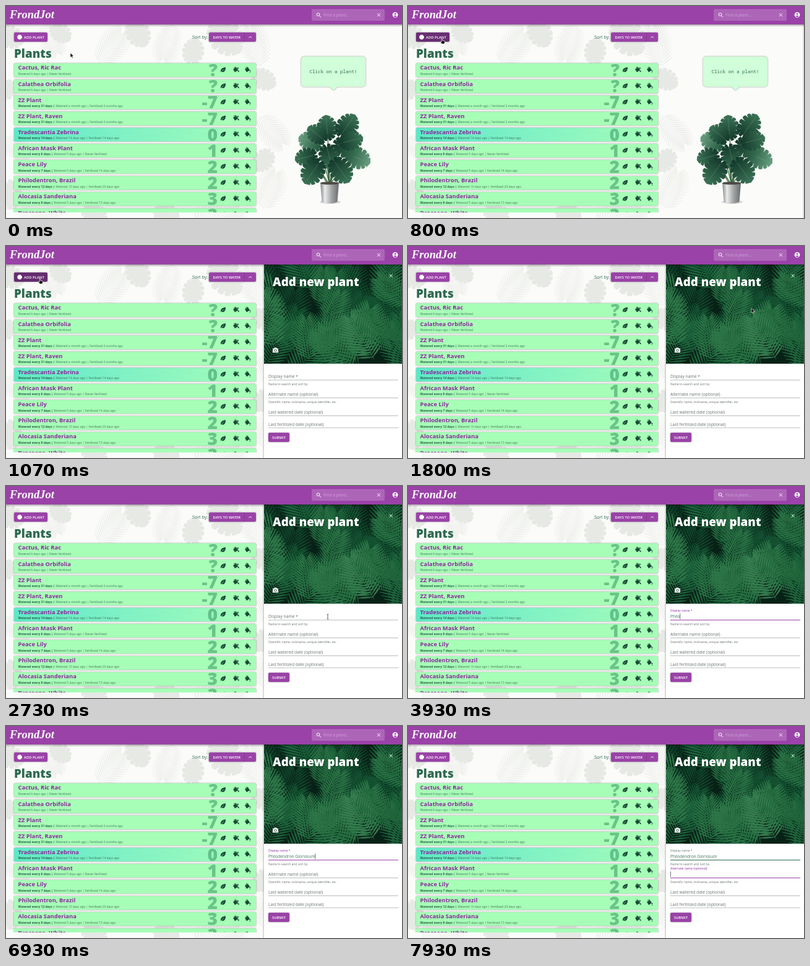
Write an HTML page that moves like this. It is 640 by 344 pixels and loops after 8 s.

```html
<!DOCTYPE html>
<html lang="en">
<head>
<meta charset="utf-8">
<title>Plant tracker</title>
<style>
html, body { margin: 0; width: 100%; height: 100%; overflow: hidden; background: #fbfbfa; }
svg { display: block; width: 100%; height: 100%; font-family: "Open Sans", sans-serif; }
text { white-space: pre; }
.brand { font: italic bold 18.5px "Liberation Serif", serif; fill: #fff; }
.heading { font-size: 18.8px; font-weight: 800; }
.name { font-size: 9.4px; font-weight: 700; fill: #8b2a9b; }
.note { font-size: 4.95px; fill: #43745c; }
.note tspan { font-weight: 700; fill: #2a6049; }
.days { font-size: 28.2px; font-weight: 800; fill: #2d8a5a; fill-opacity: .5; text-anchor: end; }
.button { font-size: 5.9px; font-weight: 600; fill: #fff; }
.mono { font: 7.52px "Roboto Mono", "Noto Sans Mono", monospace; fill: #2f6b50; }
.label { font-size: 6.75px; }
.help { font-size: 4.95px; fill: #68736d; }
.typed { font-size: 6.58px; fill: #3a7459; }
.raised { filter: drop-shadow(0 .8px .8px rgba(0,0,0,.45)); }
</style>
</head>
<body>
<svg id="stage" viewBox="0 0 640 344" preserveAspectRatio="none"></svg>
<script>
const LOOP = 8000, PURPLE = '#9a42a8', GREEN = '#2d6b50', PANEL_X = 417;
const stage = document.getElementById('stage');
const clamp = v => Math.max(0, Math.min(1, v));
const smooth = v => v * v * (3 - 2 * v);
const easeOut = v => 1 - (1 - clamp(v)) ** 3;
const pt = (x, y) => x.toFixed(3) + ' ' + y.toFixed(3);

// Split heart-shaped leaf, stem at the origin, tip at x = 1.
function splitLeaf() {
  const side = [];
  for (let i = 0; i < 7; i++) {
    const a = 2.85 - i * .42;
    for (const [da, k] of [[.15, .96], [0, 1.04], [-.13, .98], [-.21, .5]])
      if (i < 6 || da >= 0) side.push([.4 + .6 * Math.cos(a + da) * (k < .6 ? .8 : 1), .48 * k * Math.sin(a + da)]);
  }
  const mirror = side.slice().reverse().map(([x, y]) => [x, -y]);
  return 'M0 0L' + [...side, [1.03, 0], ...mirror].map(p => pt(...p)).join('L') + 'Z';
}

// Palm frond, stem at the origin, tip near x = 1.
function frond(count = 17) {
  let d = '';
  for (let i = 1; i <= count; i++) {
    const u = i / count, x = u * .92, len = .12 + .36 * Math.sin(Math.PI * (.12 + .78 * u));
    for (const s of [-1, 1]) {
      const a = s * (1.15 - .6 * u), c = Math.cos(a), n = Math.sin(a), w = .024;
      d += `M${pt(x, 0)}Q${pt(x + c * len * .5 - n * w, n * len * .5 + c * w)} ${pt(x + c * len, n * len)}` +
           `Q${pt(x + c * len * .5 + n * w, n * len * .5 - c * w)} ${pt(x, 0)}`;
    }
  }
  return d;
}

const use = (id, x, y, size, angle, fill) =>
  `<use href="#${id}" transform="translate(${x} ${y}) rotate(${angle}) scale(${size})" fill="${fill}" stroke="${fill}"/>`;
const text = (cls, x, y, s, extra = '') => `<text class="${cls}" x="${x}" y="${y}" ${extra}>${s}</text>`;
const box = (x, y, w, h, fill, extra = '') => `<rect x="${x}" y="${y}" width="${w}" height="${h}" fill="${fill}" ${extra}/>`;
const cross = (x, y, r) => `<path d="M${x - r} ${y - r}l${2 * r} ${2 * r}m0 ${-2 * r}l${-2 * r} ${2 * r}" stroke="#fff" fill="none"/>`;

const defs = `<defs>
  <path id="split" d="${splitLeaf()}" stroke-width=".025" stroke-linejoin="round"/>
  <path id="frond" d="${frond()}M0 0L.95 0" stroke-width=".008"/>
  <linearGradient id="due"><stop stop-color="#5ce9c6"/><stop offset=".4" stop-color="#7cf0c6"/><stop offset="1" stop-color="#a5fdb8"/></linearGradient>
  <linearGradient id="dark"><stop stop-color="#12372a"/><stop offset="1" stop-color="#3b7355"/></linearGradient>
  <linearGradient id="light"><stop stop-color="#1d5039"/><stop offset="1" stop-color="#6a9f80"/></linearGradient>
  <linearGradient id="metal"><stop stop-color="#85888a"/><stop offset=".25" stop-color="#e9eaea"/><stop offset=".6" stop-color="#a2a5a6"/><stop offset="1" stop-color="#686c6e"/></linearGradient>
  <linearGradient id="shade" x2="0" y2="1"><stop stop-opacity=".3"/><stop offset="1" stop-opacity="0"/></linearGradient>
  <clipPath id="list"><rect y="90" width="410" height="245"/></clipPath>
  <clipPath id="photo"><rect width="223" height="161"/></clipPath>
  <g id="leafIcon"><path d="M-4 4C-5-2 0-4 4-4C4 1 2 5-3 3.2Z"/><path d="M-4 4L1-1" stroke="#a7feb7" stroke-width=".7"/></g>
  <g id="can"><path d="M-4-1L1-4L4 .5L-1 4Z"/><path d="M-2-2Q-3-5 1-4M3 1L5 2" fill="none" stroke="#174a35" stroke-width="1"/></g>
</defs>`;

function backdrop() {
  const leaves = [
    ['split', -8, 45, 38, 20], ['frond', 60, 28, 55, 65], ['split', 78, 35, 32, 40], ['frond', 150, 96, 66, -55],
    ['split', 205, 30, 40, 60], ['frond', 270, 28, 62, 105], ['split', 300, 88, 36, -80], ['split', 340, 34, 55, 48],
    ['frond', 412, 100, 70, -105], ['split', 404, 112, 35, 30], ['frond', 408, 178, 62, 50], ['split', 425, 240, 34, 130],
    ['frond', 415, 330, 65, -70], ['split', 10, 130, 34, 150], ['frond', -5, 215, 50, 35], ['split', 3, 290, 40, 80],
    ['frond', 20, 344, 70, -20], ['split', 130, 330, 36, 30], ['split', 245, 333, 35, 15], ['frond', 300, 350, 80, -15]
  ];
  return box(0, 0, 640, 344, '#fbfbfa') +
    leaves.map(([id, x, y, s, a]) => use(id, x, y, s, a, id === 'split' ? '#e6e9e4' : '#edefeb')).join('');
}

function header() {
  return box(0, 30, 640, 4, 'url(#shade)') + box(0, 0, 640, 30, PURPLE) + text('brand', 6, 20, 'FrondJot') +
    box(494, 5, 118, 19, '#ad65b8', 'rx="2"') +
    `<g fill="none" stroke="#fff" stroke-width="1"><circle cx="504.5" cy="13.8" r="2.4"/><path d="M506.3 15.6l2.7 2.7"/></g>` +
    text('label', 513, 17, 'Find a plant...', 'fill="#cfa0d6"') + cross(602.5, 14.5, 2.4) +
    `<circle cx="629" cy="14.3" r="4.4" fill="#fff"/><g fill="${PURPLE}"><circle cx="629" cy="12.8" r="1.4"/><path d="M626.2 16.8Q629 13.8 631.8 16.8Q629 19 626.2 16.8"/></g>`;
}

function toolbar() {
  return `<g class="raised">${box(13, 43, 54, 15, PURPLE, 'rx="2" id="add"')}${box(328, 43, 76, 15, PURPLE, 'rx="2"')}</g>` +
    `<circle id="ripple" cx="55" cy="51" fill="#fff"/>` +
    `<circle cx="22" cy="50.5" r="2.9" fill="#fff" stroke="#fff" stroke-width="2.2" stroke-dasharray="1.7 .6"/>` +
    text('button', 29, 52.7, 'ADD PLANT') + text('label', 301, 53, 'Sort by:', `fill="${GREEN}" style="font-size:7.1px"`) +
    text('button', 334.5, 52.7, 'DAYS TO WATER') +
    `<path d="M385.5 43v15" stroke="#7d3289" stroke-width=".6"/><path d="M392.5 51.7l2.2-2.2l2.2 2.2" fill="none" stroke="#fff" stroke-width="1"/>` +
    text('heading', 13, 84, 'Plants', `fill="${GREEN}"`);
}

const plants = [
  ['Cactus, Ric Rac', '?', 0, '6 days', 'Never fertilized'],
  ['Calathea Orbifolia', '?', 0, '6 days', 'Never fertilized'],
  ['ZZ Plant', '-7', 31, 'a month', 'Fertilized 2 months ago'],
  ['ZZ Plant, Raven', '-7', 31, 'a month', 'Fertilized 2 months ago'],
  ['Tradescantia Zebrina', '0', 14, '14 days', 'Fertilized 14 days ago'],
  ['African Mask Plant', '1', 6, '5 days', 'Never fertilized'],
  ['Peace Lily', '2', 7, '5 days', 'Fertilized 14 days ago'],
  ['Philodentron, Brazil', '2', 12, '10 days', 'Fertilized 20 days ago'],
  ['Alocasia Sanderiana', '3', 8, '5 days', 'Fertilized 13 days ago'],
  ['Dracaena, White', '3', 8, '5 days', 'Never fertilized']
];
function row([name, days, every, watered, fed], i) {
  const cycle = every ? `<tspan>Watered every ${every} days |</tspan> ` : '';
  const icon = (id, x) => `<use href="#${id}" x="${x}" y="10.5" fill="#174a35"/>`;
  return `<g transform="translate(0 ${93 + i * 26.13})">` +
    box(13, 0, 391, 22.3, days === '0' ? 'url(#due)' : '#a7feb7', 'rx="1.5" class="raised"') +
    text('days', 342, 21.2, days) + text('name', 19.5, 10.4, name) +
    text('note', 19.5, 18.8, `${cycle}Watered ${watered} ago | ${fed}`) +
    icon('leafIcon', 351) + icon('can', 371) + icon('can', 390) +
    `<g fill="#174a35"><path d="M373 7l3 0l-1 3zM374 13l2.5-1.5l0 3z"/><circle cx="395" cy="12.5" r=".8"/><circle cx="394.3" cy="14.6" r=".7"/></g></g>`;
}

function welcome() {
  const leaves = [
    [520, 212, 34, -95, 0], [543, 207, 36, -55, 0], [506, 225, 34, -160, 1], [497, 242, 30, 165, 0],
    [554, 241, 36, 22, 1], [535, 225, 36, 15, 0], [519, 231, 35, 75, 0], [505, 256, 38, 125, 0],
    [532, 254, 38, 55, 0], [545, 222, 32, -15, 0], [512, 216, 30, -140, 0]
  ];
  const stems = leaves.map(([x, y]) => `M523 290Q${(x + 523) / 2} ${y + 30} ${x} ${y}`).join('');
  return `<g class="raised">${box(477, 82, 104, 49, '#d0ffd9', 'rx="5"')}<path d="M523.5 131h12l-6 6z" fill="#d0ffd9"/></g>` +
    text('mono', 490.5, 109, 'Click on a plant!') +
    `<ellipse cx="524" cy="318" rx="17" ry="3" fill="#000" opacity=".15"/><path d="${stems}" fill="none" stroke="#3d6b43" stroke-width="1.3"/>` +
    leaves.map(([x, y, s, a, lit]) => use('split', x, y, s, a, `url(#${lit ? 'light' : 'dark'})`) +
      `<path d="M0 0L${s * .9} 0" transform="translate(${x} ${y}) rotate(${a})" stroke="#7fa58a" stroke-width=".5" opacity=".7"/>`).join('') +
    `<path d="M508 287H538L535.5 318Q523 323 510.5 318Z" fill="url(#metal)"/><ellipse cx="523" cy="287.5" rx="15" ry="2.3" fill="#4c4b43"/>`;
}

function photo() {
  let seed = 23, out = box(0, 0, 223, 161, '#0a2419');
  const rnd = () => (seed = seed * 16807 % 2147483647) / 2147483647;
  const tones = ['#0f3b27', '#155032', '#1b653d', '#287c4b', '#3a9058'];
  for (let i = 0; i < 48; i++) {
    const tone = tones[Math.min(4, Math.floor(i / 11 + rnd()))];
    out += use('frond', (rnd() * 270 - 25).toFixed(1), (rnd() * 160 + 22).toFixed(1), (55 + rnd() * 38).toFixed(1), (-rnd() * 150 - 15).toFixed(1), tone);
  }
  out += use('frond', 95, 158, 96, -45, '#31864f') + use('frond', 178, 154, 80, -120, '#479b64') + use('frond', 150, 78, 72, 40, '#2c7d4a');
  return `<g clip-path="url(#photo)">${out}${box(0, 0, 223, 161, '#03170e', 'opacity=".22"')}</g>`;
}

const fields = [
  ['Display name *', 217.5, 'Name to search and sort by'],
  ['Alternate name (optional)', 246.5, 'Scientific name, nickname, unique identifier, etc'],
  ['Last watered date (optional)', 275.5, ''],
  ['Last fertilized date (optional)', 295, '']
];
function panel() {
  const form = fields.map(([label, y, help], i) =>
    `<text class="label" id="label${i}">${label}</text>` +
    `<path d="M7 ${y}H217" stroke="#8b928e" stroke-width=".6"/><path id="line${i}" stroke-width="1.1"/>` +
    text('help', 7, y + 8, help)).join('');
  return `<g id="panel">${box(-2, 30, 3, 314, '#000', 'opacity=".13"')}${box(0, 30, 223, 314, '#fff')}<g transform="translate(0 30)">${photo()}</g>` +
    text('heading', 14, 65, 'Add new plant', 'fill="#fff"') + cross(205, 48.3, 2.5) +
    `<path d="M14 166.3h2l1-1.3h3l1 1.3h2v6.7h-9z" fill="#fff"/><circle cx="18.5" cy="169.6" r="1.8" fill="none" stroke="#12382a" stroke-width=".8"/>` +
    form + text('typed', 7, 214.2, '', 'id="typed"') + `<path id="caret" stroke="#333" stroke-width=".7"/>` +
    box(7, 303, 34, 15, PURPLE, 'rx="2" class="raised"') + text('button', 24, 312.7, 'SUBMIT', 'text-anchor="middle"') + '</g>';
}

const cursors = `<g id="cursor" stroke-linejoin="round">
  <path id="arrow" d="M0 0V7.6L1.8 6L3 8.8L4.3 8.2L3.1 5.5H5.5Z" fill="#111" stroke="#fff" stroke-width=".6"/>
  <path id="hand" d="M-.8 .3Q0-.7 .8 .3V3L4 3.8Q4.8 4.2 4.5 6L3.6 8.6H-.4L-2.8 5.2Q-2.2 4.2-.8 5.3Z" fill="#111" stroke="#fff" stroke-width=".7"/>
  <path id="beam" d="M-1.5-4Q0-4 0-3Q0-4 1.5-4M0-3V3M-1.5 4Q0 4 0 3Q0 4 1.5 4" fill="none" stroke="#222" stroke-width=".7"/>
</g>`;

stage.innerHTML = defs + backdrop() + toolbar() + `<g clip-path="url(#list)">${plants.map(row).join('')}</g>` +
  welcome() + panel() + header() + cursors;

const $ = id => document.getElementById(id);
const set = (id, attrs) => { for (const k in attrs) $(id).setAttribute(k, attrs[k]); };

const CLICK = 800, FOCUS = 2900, TYPE = 3200, KEY = 164, TAB = 7450;
const ENTRY = 'Philodendron Gloriosum';
const route = [[0, 104, 76], [80, 104, 76], [620, 55, 53], [1250, 55, 53], [1760, 555, 101], [2150, 555, 101], [2620, 520, 212], [LOOP, 520, 212]];

function pointer(t) {
  const i = route.findIndex(p => p[0] > t), [t0, x0, y0] = route[i - 1], [t1, x1, y1] = route[i];
  const k = smooth((t - t0) / (t1 - t0));
  return [x0 + (x1 - x0) * k, y0 + (y1 - y0) * k];
}

function drawField(i, t, focusAt, blurAt) {
  const y = fields[i][1], up = easeOut((t - focusAt) / 200), focused = t >= focusAt && t < blurAt;
  const half = 105 * up, hovered = i === 0 && t >= blurAt;
  set('label' + i, {
    transform: `translate(7 ${y - 3.5 - 10.4 * up}) scale(${1 - .26 * up})`,
    fill: focused ? '#8e2a9e' : '#68736d'
  });
  set('line' + i, { d: `M${112 - half} ${y}H${112 + half}`, stroke: focused ? PURPLE : GREEN, opacity: focused || hovered ? 1 : 0 });
}

function render(t) {
  const slide = easeOut((t - CLICK) / 240);
  set('panel', { transform: `translate(${PANEL_X + 226 * (1 - slide)} 0)` });

  const [x, y] = pointer(t), overAdd = x < 67 && y < 58, overField = y > 203;
  set('cursor', { transform: `translate(${x} ${y})`, opacity: t < TYPE ? 1 : 0 });
  set('arrow', { opacity: overAdd || overField ? 0 : 1 });
  set('hand', { opacity: overAdd ? 1 : 0 });
  set('beam', { opacity: overField ? 1 : 0 });

  const hover = clamp((t - 570) / 250) * (1 - clamp((t - 1290) / 250));
  const mix = (a, b) => Math.round(a + (b - a) * hover);
  set('add', { fill: `rgb(${mix(154, 101)},${mix(66, 44)},${mix(168, 112)})` });
  const wave = clamp((t - CLICK) / 260);
  set('ripple', { r: 7 * wave, opacity: t > CLICK ? .22 * (1 - wave) : 0 });

  drawField(0, t, FOCUS, TAB);
  drawField(1, t, TAB, LOOP);
  drawField(2, t, LOOP, LOOP);
  drawField(3, t, LOOP, LOOP);

  const count = Math.max(0, Math.min(ENTRY.length, Math.floor((t - TYPE) / KEY) + 1));
  $('typed').textContent = ENTRY.slice(0, count);
  const lastKey = t >= TAB ? TAB : count ? TYPE + (count - 1) * KEY : FOCUS;
  const caretX = t >= TAB ? 7.4 : 7.4 + (count ? $('typed').getComputedTextLength() : 0);
  const caretY = t >= TAB ? 236 : 207;
  set('caret', { d: `M${caretX} ${caretY}v9`, opacity: t >= FOCUS && (t - lastKey) % 1000 < 500 ? 1 : 0 });
}

const start = performance.now();
function tick() {
  render((performance.now() - start) % LOOP);
  requestAnimationFrame(tick);
}
tick();
</script>
</body>
</html>
```
